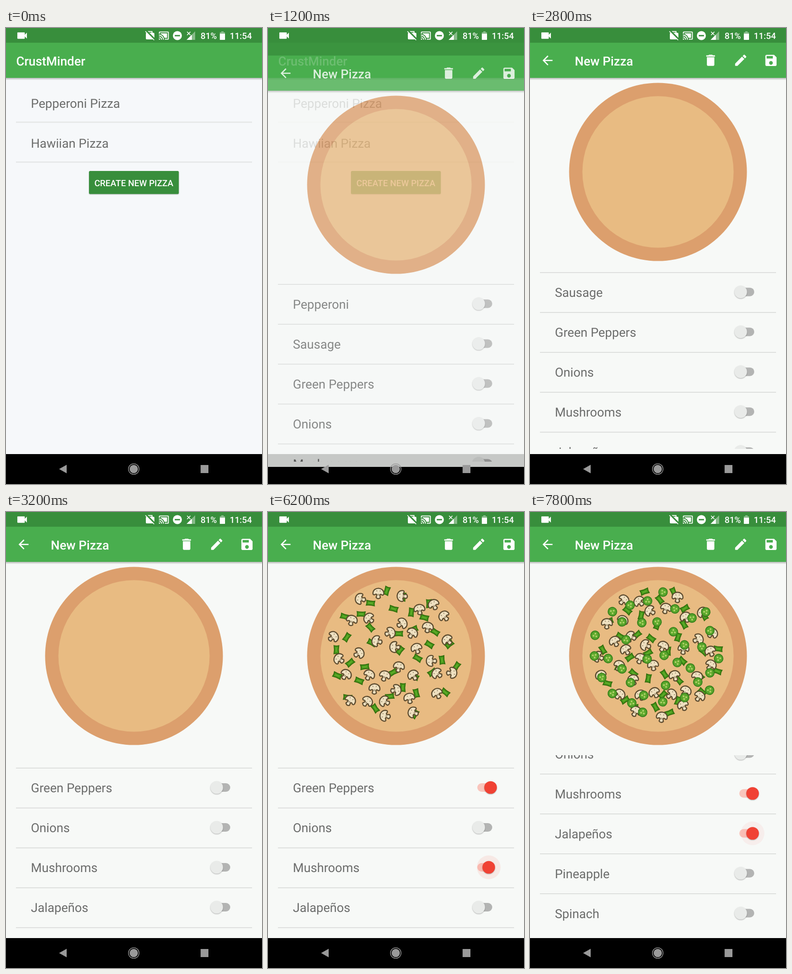
An HTML page with a canvas that plays this animation: 540 px wide and 960 px high, repeating every 8000 ms.

```html
<!DOCTYPE html>
<html lang="en">
<head>
<meta charset="utf-8">
<title>Pizza toppings</title>
<style>
html, body { margin: 0; width: 100%; height: 100%; overflow: hidden; background: #000; }
canvas { display: block; width: 540px; height: 960px; }
</style>
</head>
<body>
<canvas id="stage" width="540" height="960"></canvas>
<script>
const LOOP = 8000, STEP = 200, W = 540, H = 960, NAV_Y = 897;
const FONT = 'Roboto, "Noto Sans", sans-serif';
const GREEN = '#49ae4e', DARK = '#388e3c', GREY = '#6c6d6c', RED = '#f04234', NAV = '#9a9a9a';
const main = document.getElementById('stage').getContext('2d');
const layer = document.createElement('canvas');
layer.width = W;
layer.height = H;
const sheet = layer.getContext('2d');
main.textRendering = sheet.textRendering = 'geometricPrecision';

const clamp = v => Math.max(0, Math.min(1, v));
const smooth = v => { v = clamp(v); return v * v * (3 - 2 * v); };

// Material style icons on a 24 unit grid
const ICONS = {
  back: 'M20 11H7.83l5.59-5.59L12 4l-8 8 8 8 1.41-1.41L7.83 13H20v-2z',
  bin: 'M6 19c0 1.1.9 2 2 2h8c1.1 0 2-.9 2-2V7H6v12zM19 4h-3.5l-1-1h-5l-1 1H5v2h14V4z',
  pen: 'M3 17.25V21h3.75L17.81 9.94l-3.75-3.75L3 17.25zM20.71 7.04c.39-.39.39-1.02 0-1.41l-2.34-2.34c-.39-.39-1.02-.39-1.41 0l-1.83 1.83 3.75 3.75 1.83-1.83z',
  save: 'M17 3H5c-1.11 0-2 .9-2 2v14c0 1.1.89 2 2 2h14c1.1 0 2-.9 2-2V7l-4-4zm-5 16c-1.66 0-3-1.34-3-3s1.34-3 3-3 3 1.34 3 3-1.34 3-3 3zm3-10H5V5h10v4z',
  cast: 'M21 3H3c-1.1 0-2 .9-2 2v3h2V5h18v14h-7v2h7c1.1 0 2-.9 2-2V5c0-1.1-.9-2-2-2zM1 18v3h3c0-1.66-1.34-3-3-3zm0-4v2c2.76 0 5 2.24 5 5h2c0-3.87-3.13-7-7-7zm0-4v2c4.97 0 9 4.03 9 9h2c0-6.08-4.93-11-11-11zM19 7H5v1.63c3.96 1.28 7.09 4.41 8.37 8.37H19V7z',
  video: 'M17 10.5V7c0-.55-.45-1-1-1H4c-.55 0-1 .45-1 1v10c0 .55.45 1 1 1h12c.55 0 1-.45 1-1v-3.5l4 4v-11l-4 4z'
};
for (const k in ICONS) ICONS[k] = new Path2D(ICONS[k]);

function icon(c, name, x, y, scale = 1.3125) {
  c.save();
  c.translate(x, y);
  c.scale(scale, scale);
  c.translate(-12, -12);
  c.fillStyle = '#fff';
  c.fill(ICONS[name]);
  c.restore();
}

function text(c, str, x, y, size, color, weight = 400) {
  c.font = `${weight} ${size}px ${FONT}`;
  c.fillStyle = color;
  c.fillText(str, x, y);
}

function rect(c, x, y, w, h, color, r = 0) {
  c.fillStyle = color;
  c.beginPath();
  c.roundRect(x, y, w, h, r);
  c.fill();
}

function disc(c, x, y, r, color) {
  c.fillStyle = color;
  c.beginPath();
  c.arc(x, y, r, 0, 7);
  c.fill();
}

function ring(c, x, y, r, width, color) {
  c.strokeStyle = color;
  c.lineWidth = width;
  c.beginPath();
  c.arc(x, y, r, 0, 7);
  c.stroke();
}

function line(c, x1, y1, x2, y2, width, color) {
  c.strokeStyle = color;
  c.lineWidth = width;
  c.beginPath();
  c.moveTo(x1, y1);
  c.lineTo(x2, y2);
  c.stroke();
}

function poly(c, color, ...pts) {
  c.fillStyle = color;
  c.beginPath();
  for (let i = 0; i < pts.length; i += 2) c.lineTo(pts[i], pts[i + 1]);
  c.closePath();
  c.fill();
}

function withShadow(c, blur, dy, alpha, draw) {
  c.save();
  c.shadowColor = `rgba(0,0,0,${alpha})`;
  c.shadowBlur = blur;
  c.shadowOffsetY = dy;
  draw();
  c.restore();
}

// --- toppings ---

function random(seed) {
  return () => {
    seed = (seed * 1664525 + 1013904223) >>> 0;
    return seed / 4294967296;
  };
}

// Evenly spread random places on the pizza, each with a tilt
function scatter(seed, count = 36, gap = 29) {
  const rnd = random(seed), out = [];
  for (let i = 0; i < 6000 && out.length < count; i++) {
    const a = rnd() * Math.PI * 2, r = 137 * Math.sqrt(rnd());
    const x = 267 + r * Math.cos(a), y = 299 + r * Math.sin(a);
    if (out.every(p => Math.hypot(p.x - x, p.y - y) > gap)) {
      out.push({ x, y, tilt: (rnd() - 0.5) * Math.PI });
    }
  }
  return out;
}

const BOW = new Path2D('M-5-8.5Q0-7 5-8.5Q3.4 0 5 8.5Q0 7-5 8.5Q-3.4 0-5-8.5Z');
const CAP = new Path2D('M-11.5 0C-11-14 11-14 11.5 0Q11.5 4 8 3.5Q5.5 1 3 3L4.5 9Q0 13.5-4.5 9L-3 3Q-5.5 1-8 3.5Q-11.5 4-11.5 0Z');
const GILL = new Path2D('M-4-6L-3-4M4-6L3-4M0 1V5');

function pepper(c) {
  c.fillStyle = '#489a1b';
  c.fill(BOW);
  c.strokeStyle = '#326f0d';
  c.lineWidth = 2;
  c.stroke(BOW);
  rect(c, -1.2, -5, 2.4, 10, '#62ad2c', 1);
}

function mushroom(c) {
  c.fillStyle = '#eee0c0';
  c.fill(CAP);
  c.strokeStyle = '#5d4c30';
  c.lineWidth = 2.4;
  c.lineJoin = 'round';
  c.stroke(CAP);
  c.lineWidth = 1;
  c.stroke(GILL);
}

function jalapeno(c) {
  disc(c, 0, 0, 10, '#35801a');
  disc(c, 0, 0, 8.2, '#58a42c');
  for (let i = 0; i < 3; i++) {
    c.rotate(Math.PI * 2 / 3);
    disc(c, 0, -3.2, 2.6, '#7dbb3d');
    disc(c, 0, -3.6, 1.1, '#e0e2a0');
  }
}

// Every switch that turns on lays all toppings out again
const LAYOUTS = [
  { at: 4800, kinds: [pepper] },
  { at: 6200, kinds: [pepper, mushroom] },
  { at: 7600, kinds: [pepper, mushroom, jalapeno] }
];
for (const l of LAYOUTS) l.parts = l.kinds.map((draw, i) => ({ draw, spots: scatter(l.at + 31 * i) }));

function pizza(c, t) {
  disc(c, 270, 303, 187.5, '#dc9f6d');
  disc(c, 270, 303, 159.5, '#e8bb82');
  const layout = LAYOUTS.filter(l => t >= l.at).pop();
  if (!layout) return;
  for (const { draw, spots } of layout.parts) {
    for (const { x, y, tilt } of spots) {
      c.save();
      c.translate(x, y);
      c.rotate(tilt);
      draw(c);
      c.restore();
    }
  }
}

// --- screens ---

const ROWS = ['Pepperoni', 'Sausage', 'Green Peppers', 'Onions', 'Mushrooms', 'Jalapeños', 'Pineapple', 'Spinach'];
const SWITCHED = { 'Green Peppers': 4790, 'Mushrooms': 6050, 'Jalapeños': 7560 };
const TOUCHES = [
  { at: 3800, x: 450, y: 682 },
  { at: 4800, x: 463, y: 577 },
  { at: 6600, x: 353, y: 795 },
  { at: 7000, x: 512, y: 586 },
  { at: 7400, x: 441, y: 686 }
];

function scrollAt(t) {
  const first = 1 - (1 - clamp((t - 2700) / 400)) ** 3;
  return 141.5 * first + 155.5 * smooth((t - 6600) / 200);
}

function toggle(c, y, age) {
  const p = smooth(age / 200), on = p > 0.05, x = 444.5 + 25 * p;
  rect(c, 441.5, y - 9, 31.5, 18, p > 0 ? '#f9c5bc' : '#b3b4b3', 9);
  const glow = age > 60 ? 0.09 * clamp((330 - age) / 150) : 0;
  if (glow) disc(c, x, y, 25, `rgba(240,66,52,${glow})`);
  withShadow(c, 2, 1, 0.3, () => disc(c, x, y, 13.3, on ? RED : '#e9ebe9'));
}

function appBar(c) {
  const g = c.createLinearGradient(0, 105, 0, 110);
  g.addColorStop(0, 'rgba(0,0,0,.26)');
  g.addColorStop(1, 'rgba(0,0,0,0)');
  rect(c, 0, 105, W, 5, g);
  rect(c, 0, 0, W, 105, GREEN);
  rect(c, 0, 0, W, 31, DARK);
}

function homeScreen(c, pressed) {
  rect(c, 0, 0, W, NAV_Y, '#f6f8fa');
  appBar(c);
  text(c, 'CrustMinder', 21.5, 78.5, 26.25, '#fff', 500);
  ['Pepperoni Pizza', 'Hawiian Pizza'].forEach((name, i) => {
    text(c, name, 52.5, 168 + 84 * i, 26.25, GREY);
    rect(c, 21, 197 + 84 * i, 498, 2.6, '#e5e7e7');
  });
  withShadow(c, 2, 1, 0.25, () => rect(c, 175, 301, 189.5, 48.5, pressed ? '#4b9a4f' : DARK, 2.5));
  c.textAlign = 'center';
  text(c, 'CREATE NEW PIZZA', 269.7, 333, 18.375, '#fff', 500);
  c.textAlign = 'left';
}

function editScreen(c, t) {
  rect(c, 0, 0, W, NAV_Y, '#f7f9f7');
  appBar(c);
  icon(c, 'back', 37, 68.3);
  text(c, 'New Pizza', 94.5, 78.5, 26.25, '#fff', 500);
  icon(c, 'bin', 381, 68);
  icon(c, 'pen', 444.5, 68);
  icon(c, 'save', 508.3, 68.3);
  pizza(c, t);
  c.save();
  c.beginPath();
  c.rect(0, 512, W, 374);
  c.clip();
  const top = 512 - scrollAt(t);
  ROWS.forEach((name, i) => {
    const y = top + 84 * i;
    rect(c, 21, y, 498, 1.2, '#cfd1cf');
    text(c, name, 52.5, Math.round(y + 51.5), 26.25, GREY);
    toggle(c, y + 41.5, name in SWITCHED ? t - SWITCHED[name] : -1);
  });
  c.restore();
}

function statusBar(c) {
  icon(c, 'video', 34, 16, 1.12);
  // briefcase with a slash
  rect(c, 295, 10, 18, 14, '#fff', 2);
  c.lineWidth = 2;
  c.strokeStyle = '#fff';
  c.strokeRect(300, 7.5, 8, 4);
  line(c, 295.5, 6, 314, 24.5, 4, DARK);
  line(c, 294, 7, 312.5, 25.5, 1.7, '#fff');
  icon(c, 'cast', 333, 16, 0.95);
  disc(c, 361.5, 16, 9.5, '#fff');
  rect(c, 356, 14.7, 11, 2.8, DARK);
  // signal
  poly(c, '#88bb8a', 399, 7, 399, 25, 381, 25);
  poly(c, '#fff', 392, 14, 392, 25, 381, 25);
  line(c, 382, 8, 389, 15, 1.6, '#fff');
  line(c, 389, 8, 382, 15, 1.6, '#fff');
  text(c, '81%', 410.5, 23, 18.375, '#fff', 500);
  // battery
  rect(c, 454, 7, 5, 3, '#88bb8a');
  rect(c, 451, 9, 11, 16, '#88bb8a', 1);
  rect(c, 451, 12, 11, 13, '#fff', 1);
  text(c, '11:54', 472, 23, 18.375, '#fff', 500);
}

function navBar(c) {
  poly(c, NAV, 112, 928.5, 128, 919.5, 128, 937.5);
  disc(c, 269.5, 928.5, 8.7, NAV);
  ring(c, 269.5, 928.5, 11.2, 1.3, NAV);
  rect(c, 410.5, 920, 16.5, 17, NAV);
}

function touch(c, x, y) {
  disc(c, x, y, 14.5, 'rgba(255,255,255,.62)');
  ring(c, x, y, 14, 2, 'rgba(160,175,185,.6)');
}

function render(t) {
  const c = main;
  rect(c, 0, 0, W, H, '#000');
  const age = t - 1134, alpha = clamp(age / 82);
  if (alpha < 1) homeScreen(c, t >= 1000);
  if (alpha > 0) {
    sheet.clearRect(0, 0, W, H);
    editScreen(sheet, t);
    const rise = Math.round(77 * (1 - clamp(age / 350)) ** 5);
    c.globalAlpha = alpha;
    c.drawImage(layer, 0, rise);
    c.globalAlpha = 1;
    rect(c, 0, 0, W, 31, DARK);
  }
  statusBar(c);
  navBar(c);
  for (const { at, x, y } of TOUCHES) if (t === at) touch(c, x, y);
}

const start = performance.now();
function tick() {
  const t = (performance.now() - start) % LOOP;
  render(Math.floor(t / STEP) * STEP);
  requestAnimationFrame(tick);
}
tick();
</script>
</body>
</html>
```
